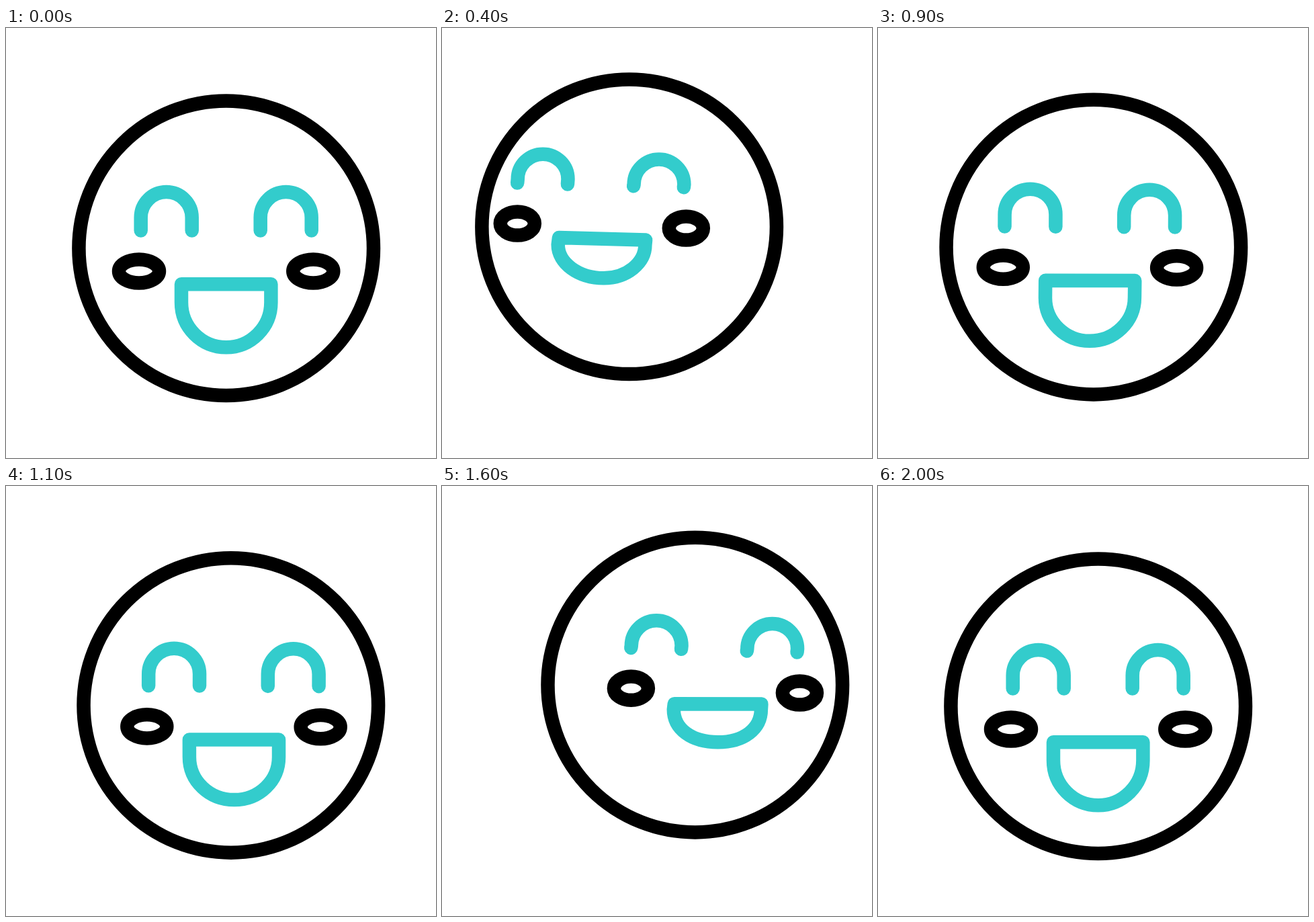
Recreate the animation shown at these times as an HTML page with a canvas. Size 640 px wide and 640 px high, loop 2.22 s.

```html
<!DOCTYPE html>
<html lang="en">
<head>
<meta charset="utf-8">
<title>Laughing face</title>
<style>
html, body { margin: 0; width: 100%; height: 100%; overflow: hidden; background: #fff; }
canvas { display: block; width: 640px; height: 640px; }
</style>
</head>
<body>
<canvas id="stage" width="640" height="640"></canvas>
<script>
const ctx = document.getElementById('stage').getContext('2d');
const LOOP = 2220, SWING = 500, STEP = 20;
const BLACK = '#000', TEAL = '#33cccc';
const MID = 0.59, FAR = 0.896; // progress at which the offsets below hold

// rest positions
const REST = {
  eyeL: [238.7, 282], eyeR: [416.7, 282],
  cheekL: [198, 362], cheekR: [457.3, 362],
  topL: [261, 381.3], topR: [394.4, 381.3],
  sideL: [261, 408.6], sideR: [394.4, 408.6],
  chin: [327.7, 475.3]
};

// each offset: dx, dy at MID, then dx, dy at FAR
const LEFT = {
  dir: -1, path: [22, 4, 48, 18, 51, 39], legs: [14.4, 18], round: 0,
  eyeL: [-62.5, -32.5, -88.6, -57], eyeR: [-65.4, -27, -93.7, -49.2],
  cheekL: [-60.3, -41.5, -85.7, -71], cheekR: [-65.8, -37, -94, -64],
  topL: [-61, -40.3, -87, -69.3], topR: [-63.5, -38, -91.3, -65.8],
  sideL: [-62, -50, -88.3, -86], sideR: [-64.5, -51.6, -92, -86],
  chin: [-62.7, -62.3, -87, -103]
};
const RIGHT = {
  dir: 1, path: [23, 3, 48, 17, 51, 39], legs: [17, 17], round: 0.05,
  eyeL: [57.6, -23, 80.5, -44.4], eyeR: [54.5, -19.8, 75, -39.7],
  cheekL: [59.6, -33.6, 83.4, -60.8], cheekR: [54.2, -29, 75.1, -54],
  topL: [60.3, -31.3, 84.8, -57.1], topR: [58.2, -31.3, 81, -56.9],
  sideL: [60, -42, 83.8, -76], sideR: [58, -42, 80.5, -76],
  chin: [60, -56, 83, -94]
};

const smooth = u => u * u * (3 - 2 * u);

// parabola through rest, MID and FAR
function bend(s, mid, far) {
  const m = mid / MID, f = far / FAR;
  const b = (f - m) / (FAR - MID);
  return s * (m + b * (s - MID));
}

function place(side, name, s) {
  const [x, y] = REST[name], d = side[name];
  return [x + bend(s, d[0], d[2]), y + bend(s, d[1], d[3])];
}

function cubic(t, a, b, c) {
  const q = 1 - t;
  return 3 * q * q * t * a + 3 * q * t * t * b + t * t * t * c;
}

function stroke(color, build) {
  ctx.strokeStyle = color;
  ctx.beginPath();
  build();
  ctx.stroke();
}

function drawHead(side, s) {
  const t = s - 0.16 * s * s * (1 - s); // near-even speed along the path
  const p = side.path;
  const x = 327.7 + side.dir * cubic(t, p[0], p[2], p[4]);
  const y = 327.7 - cubic(t, p[1], p[3], p[5]);
  stroke(BLACK, () => ctx.arc(x, y, 219.3, 0, Math.PI * 2));
}

function drawEye(side, name, s, shrink) {
  const [x, y] = place(side, name, s);
  const r = 38 - 0.7 * s, lean = 0.6 * s;
  stroke(TEAL, () => {
    ctx.moveTo(x - r - lean, y + 19.5 - (shrink + 1.1) * s);
    ctx.lineTo(x - r, y);
    ctx.arc(x, y, r, Math.PI, 0);
    ctx.lineTo(x + r - lean, y + 19.5 - (shrink - 1.1) * s);
  });
}

function drawCheek(side, name, s) {
  const [x, y] = place(side, name, s);
  stroke(BLACK, () => ctx.ellipse(x, y, 30 - 5 * s, 17.6, 0, 0, Math.PI * 2));
}

function drawMouth(side, s) {
  const [tl, tr, sl, sr, c] = ['topL', 'topR', 'sideL', 'sideR', 'chin']
    .map(name => place(side, name, s));
  const k = 0.5523 + side.round * s;
  const mix = (a, b) => a + (b - a) * k;
  stroke(TEAL, () => {
    ctx.moveTo(...tl);
    ctx.lineTo(...sl);
    ctx.bezierCurveTo(sl[0], mix(sl[1], c[1]), mix(c[0], sl[0]), c[1], ...c);
    ctx.bezierCurveTo(mix(c[0], sr[0]), c[1], sr[0], mix(sr[1], c[1]), ...sr);
    ctx.lineTo(...tr);
    ctx.closePath();
  });
}

function draw(ms) {
  const time = Math.min(Math.floor(ms % LOOP / STEP) * STEP, SWING * 4);
  const side = time < SWING * 2 ? LEFT : RIGHT;
  const phase = time / SWING % 2;
  const s = smooth(phase < 1 ? phase : 2 - phase);
  ctx.fillStyle = '#fff';
  ctx.fillRect(0, 0, 640, 640);
  ctx.lineWidth = 20.5;
  ctx.lineCap = ctx.lineJoin = 'round';
  drawHead(side, s);
  drawEye(side, 'eyeL', s, side.legs[0]);
  drawEye(side, 'eyeR', s, side.legs[1]);
  drawCheek(side, 'cheekL', s);
  drawCheek(side, 'cheekR', s);
  drawMouth(side, s);
}

const start = performance.now();
function tick() {
  draw(performance.now() - start);
  requestAnimationFrame(tick);
}
tick();
</script>
</body>
</html>
```
